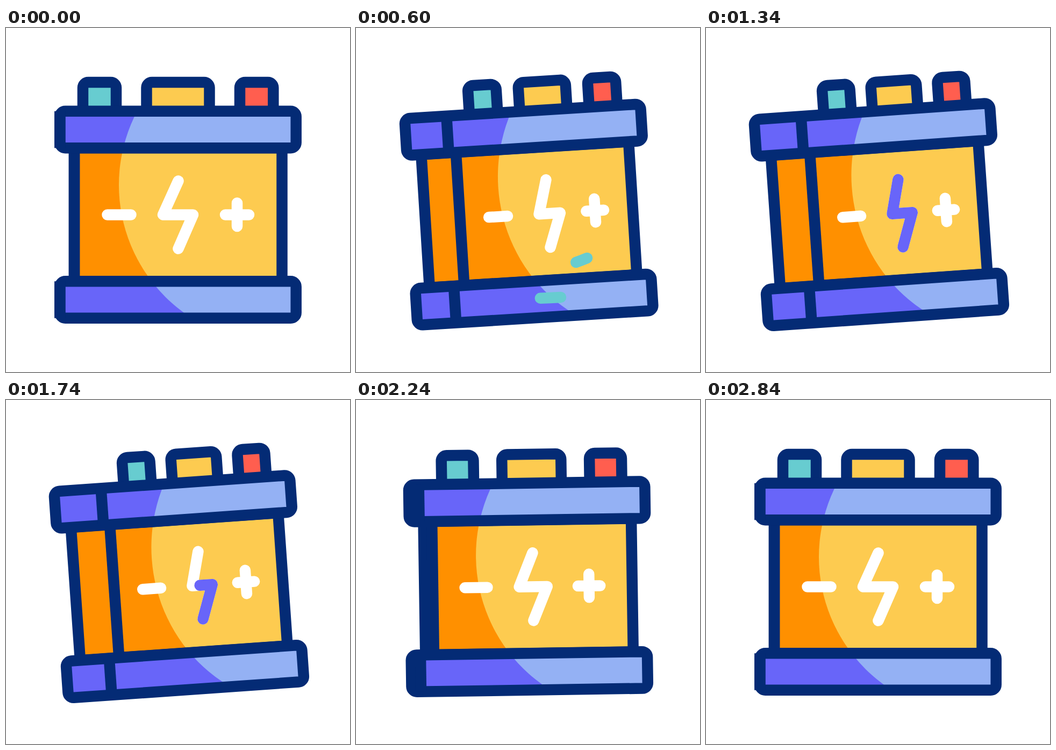
Animation, 640 px wide and 640 px high, one loop 3 s. Source, as an HTML page:

```html
<!DOCTYPE html>
<html lang="en">
<head>
<meta charset="utf-8">
<title>Battery</title>
<style>
  html, body { margin: 0; height: 100%; overflow: hidden; background: #fff; }
  svg { display: block; width: 100vw; height: 100vh; }
  .line { stroke: #042b75; stroke-width: 20.5; }
  .mark { fill: none; stroke: #fff; stroke-width: 20.5; stroke-linecap: round; stroke-linejoin: round; }
  .bolt { stroke: #6865f9; }
  .swoosh { stroke: #67ccd0; }
</style>
</head>
<body>
<svg id="stage" viewBox="0 0 640 640"></svg>
<script>
const LOOP = 3000;
const stage = document.getElementById('stage');

const clamp = x => Math.min(1, Math.max(0, x));
const part = (t, start, length) => clamp((t - start) / length);
const smooth = x => x * x * (3 - 2 * x);

// Cubic bezier easing (.4, 0, .12, 1)
function swing(x) {
  let lo = 0, hi = 1;
  for (let i = 0; i < 24; i++) {
    const u = (lo + hi) / 2, v = 1 - u;
    if (3 * v * v * u * .4 + 3 * v * u * u * .12 + u ** 3 < x) lo = u;
    else hi = u;
  }
  return smooth(lo);
}

const rect = (x1, y1, x2, y2, fill, cls = '', r = 0) =>
  `<rect x="${x1}" y="${y1}" width="${x2 - x1}" height="${y2 - y1}" rx="${r}" fill="${fill}" class="${cls}"/>`;

// Stroke showing only the stretch of the path between two fractions
const trim = (d, from, to, cls) => to - from < .002 ? '' :
  `<path d="${d}" pathLength="1" class="mark ${cls}" stroke-dasharray="${to - from} 9" stroke-dashoffset="${-from}"/>`;

function swoosh(d, t, delay) {
  return trim(d, smooth(part(t, 70 + delay, 420)), 0, '') ||
    trim(d, smooth(part(t, 240 + delay, 420)), smooth(part(t, 70 + delay, 420)), 'swoosh');
}

function draw(t) {
  const turn = swing(part(t, 70, 900)) - swing(part(t, 1745, 1050));
  const mix = (a, b) => a + (b - a) * turn;

  const cap = (l1, l2, r1, r2, fill) => rect(mix(l1, l2), 101, mix(r1, r2), 170, fill, 'line', 10);

  // Shaded box with the lit area clipped to it, an outline and the side edge
  const block = (name, x1, y1, x2, y2, shade, light, edge, r) => {
    const x = mix(x1, edge);
    return `<clipPath id="${name}">${rect(x1, y1, x2, y2, '#000')}</clipPath>` +
      rect(x1, y1, x2, y2, shade, '', r) +
      `<ellipse cx="${mix(504, 554)}" cy="292" rx="${mix(294, 281)}" ry="294" fill="${light}" clip-path="url(#${name})"/>` +
      rect(x1, y1, x2, y2, 'none', 'line', r) +
      `<path d="M${x} ${y1}V${y2}" class="line"/>`;
  };

  const bolt = `M${mix(320.5, 360)} 284.5L${mix(292, 344.6)} 347.5H${mix(348, 382)}L${mix(320.5, 360.3)} 410.5`;
  const signs = `M${mix(188.5, 252.2)} 347.5H${mix(232.5, 286)}` +
    `M${mix(408, 429.2)} 347.5H${mix(452, 460.5)}M${mix(430, 444.8)} 325.5V369`;

  stage.innerHTML =
    `<g transform="rotate(${-4 * turn} 320 320)">` +
    cap(143, 230.5, 205, 282, '#67ccd0') +
    cap(261.5, 321.3, 378.5, 406, '#fdcb50') +
    cap(435, 445.4, 497.3, 496.4, '#ff5e4f') +
    block('body', 127, 223, 513.5, 471.5, '#ff9000', '#fdcb50', 199.5, 0) +
    block('top', 100.3, 154.7, 539.7, 223.3, '#6865f9', '#94b1f4', 187.8, 10) +
    block('base', 100.3, 471.3, 539.7, 539.7, '#6865f9', '#94b1f4', 181, 10) +
    `<path d="${signs}${bolt}" class="mark"/>` +
    trim(bolt, smooth(part(t, 1540, 420)), smooth(part(t, 680, 425)), 'bolt') +
    '</g>' +
    swoosh('M42 380C110 480 300 482 430 428', t, 0) +
    swoosh('M60 450C130 505 270 507 381 501', t, 30);
}

const begin = performance.now();
function tick() {
  draw((performance.now() - begin) % LOOP);
  requestAnimationFrame(tick);
}
tick();
</script>
</body>
</html>
```
